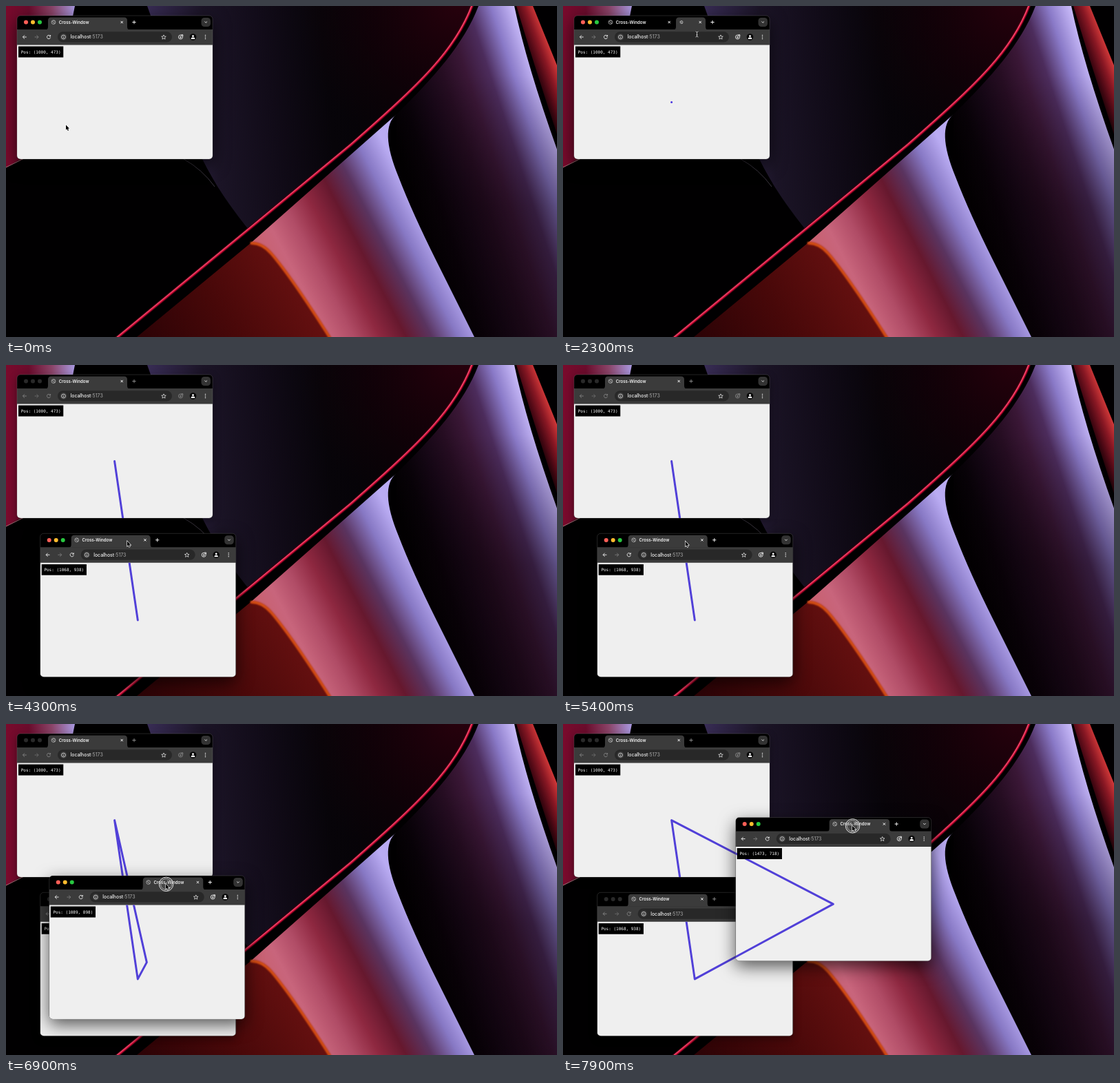
An HTML page with a canvas that plays this animation: 800 px wide and 480 px high, repeating every 8000 ms.

```html
<!DOCTYPE html>
<html lang="en">
<head>
<meta charset="utf-8">
<title>Cross-Window</title>
<style>
  html, body { margin: 0; width: 800px; height: 480px; overflow: hidden; background: #000; }
  canvas { display: block; }
</style>
</head>
<body>
<canvas id="stage" width="800" height="480"></canvas>
<script>
const LOOP = 8000, WIDTH = 284, HEIGHT = 208, PAGE_TOP = 42.5;
const CENTER = { x: 141.6, y: 125.6 };
const TEAR_2 = 2750, DROP_2 = 3850, TEAR_3 = 6750;
const UI = 'Inter, "Open Sans", sans-serif';
const MONO = '"DejaVu Sans Mono", monospace';

// Key points: time, x, y
const home = { x: 16, y: 14 };
const secondPath = [[2800, 16, 14], [3400, 9.3, 184.5], [3800, 49.7, 244.3]];
const thirdPath = [[6750, 49.7, 244.3], [7300, 149.7, 111.3], [7900, 250.7, 135.5]];
const cursorPath = [
  [200, 87, 172.5], [900, 118, 172], [1700, 186, 24], [2300, 194.5, 41], [2700, 178.5, 28],
  [DROP_2, 212, 258], [4300, 176, 255.5], [6200, 181, 256], [6650, 219, 256.3]
];

const ramp = (t, a, b) => Math.min(1, Math.max(0, (t - a) / (b - a)));
const mix = (a, b, p) => a + (b - a) * p;

// Smooth path that never overshoots its key points.
function along(keys, t, axis) {
  const slope = i => keys[i] && keys[i + 1]
    ? (keys[i + 1][axis] - keys[i][axis]) / (keys[i + 1][0] - keys[i][0]) : 0;
  const speed = i => {
    const a = slope(i - 1), b = slope(i);
    return a * b > 0 ? 2 * a * b / (a + b) : 0;
  };
  let i = 0;
  while (i < keys.length - 2 && t > keys[i + 1][0]) i++;
  const [a, b] = [keys[i], keys[i + 1]];
  const p = ramp(t, a[0], b[0]), q = 1 - p;
  return mix(a[axis], b[axis], p * p * (3 - 2 * p)) +
    (b[0] - a[0]) * p * q * (q * speed(i) - p * speed(i + 1));
}
const track = (keys, t) => ({ x: along(keys, t, 1), y: along(keys, t, 2) });

const c = document.getElementById('stage').getContext('2d');

function spread(gradient, colors) {
  colors.forEach((color, i) => gradient.addColorStop(i / (colors.length - 1), color));
  return gradient;
}
// Gradient whose lines of equal colour satisfy x - k * y = constant.
function slanted(g, k, from, to, colors) {
  const n = 1 + k * k;
  return spread(g.createLinearGradient(from / n, -k * from / n, to / n, -k * to / n), colors);
}

function paintWallpaper() {
  const sheet = document.createElement('canvas');
  sheet.width = 800;
  sheet.height = 480;
  const g = sheet.getContext('2d');
  const fill = (d, style) => { g.fillStyle = style; g.fill(new Path2D(d)); };
  const line = (d, style, width) => {
    g.strokeStyle = style;
    g.lineWidth = width;
    g.stroke(new Path2D(d));
  };
  fill('M0 0H800V480H0Z', '#010001');

  // Left sheet
  fill('M0 0H100L60 200L0 234Z', slanted(g, 0, 0, 100, ['#7a0a2c', '#6a0c2c', '#8a4468', '#a898e0']));
  line('M0 234L40 214', '#b5707e', 1);

  // Dark upper sheet
  const dusk = 'M205 0H677C652 66 600 115 500 202L352 324C325 290 305 262 285 222Z';
  fill(dusk, slanted(g, 0.1, 200, 540, ['#3a2e58', '#1b1426', '#110b18', '#070409', '#050206']));
  fill(dusk, spread(g.createRadialGradient(660, -10, 0, 660, -10, 240), ['rgba(56,0,16,.7)', 'rgba(30,0,8,0)']));
  line('M258 222Q285 237 303 262', '#4a4450', 0.8);

  // Right tube
  const tube = 'M686 0C665 55 620 105 567 157L560 480H800V208Q756 85 738 0Z';
  fill(tube, slanted(g, 0.33, 500, 738, [
    '#000', '#080208', '#160716', '#260d22', '#3a1736', '#4c2c5c', '#8a7ac8', '#cabcfa'
  ]));
  fill(tube, spread(g.createLinearGradient(0, 100, 0, 480), ['rgba(8,0,5,0)', 'rgba(8,0,5,.35)', 'rgba(8,0,5,.4)']));

  // Far right strip
  fill('M741 0H765L800 86V186Q765 80 741 0Z', slanted(g, 0.38, 725, 767, ['#080002', '#4a0814', '#8a1824', '#d03838']));

  // Lower left sheet
  fill('M355 344L190 480H472Q400 356 372 347Z', slanted(g, 0.6, -90, 185, ['#2d0306', '#480809', '#651010']));

  // Petal
  fill('M567 157L355 344Q371 343 385 359Q415 394 470 480H680L625 370Q590 300 570 248Q541 178 567 157Z',
    slanted(g, 0.52, 180, 445, [
      '#c8606e', '#c8657c', '#b04c66', '#8e2840', '#66182e', '#5a3460', '#8778c4', '#b9abf2'
    ]));
  g.save();
  g.filter = 'blur(1px)';
  const ember = 'M355 344Q371 343 385 359Q415 394 472 484';
  line(ember, '#b8340c', 4);
  line(ember, '#e8641a', 1.5);
  g.restore();

  // Bright rim
  const rim = 'M678 -4C653 65 601 113 501 201L352 324L160 482';
  line(rim, '#4a0014', 5);
  line(rim, '#d8123c', 2.6);
  g.translate(-0.6, -0.6);
  line(rim, '#ff8098', 0.8);
  return sheet;
}
const wallpaper = paintWallpaper();

function box(x, y, w, h, r, color) {
  c.fillStyle = color;
  c.beginPath();
  c.roundRect(x, y, w, h, r);
  c.fill();
}
function disc(x, y, r, color) {
  c.fillStyle = color;
  c.beginPath();
  c.arc(x, y, r, 0, 7);
  c.fill();
}
function icon(x, y, d, color, width = 0.9) {
  c.save();
  c.translate(x, y);
  c.strokeStyle = color;
  c.lineWidth = width;
  c.stroke(new Path2D(d));
  c.restore();
}
function text(s, x, y, font, color) {
  c.font = font;
  c.fillStyle = color;
  c.fillText(s, x, y);
}
const ring = r => `M${r} 0A${r} ${r} 0 1 1 ${-r} 0A${r} ${r} 0 1 1 ${r} 0`;

function drawTab({ x, w, active, untitled }) {
  if (active) {
    c.fillStyle = '#3b3b3b';
    c.fill(new Path2D(`M${x - 4} 20.5Q${x} 20.5 ${x} 16V7Q${x} 2.5 ${x + 4.5} 2.5H${x + w - 4.5}` +
      `Q${x + w} 2.5 ${x + w} 7V16Q${x + w} 20.5 ${x + w + 4} 20.5Z`));
  }
  icon(x + 8, 9.5, ring(untitled ? 2 : 2.9), '#bbb', 0.8);
  icon(x + 8, 9.5, 'M-2.2 -1Q0 -.6 0 .6T2 1.2M-.2 -2.4L1.4 -.8', '#bbb', 0.9);
  if (!untitled) text('Cross-Window', x + 15.7, 11.8, '600 6.1px ' + UI, '#f4f4f4');
  icon(x + w - 7.8, 9.5, 'M-1.6 -1.6L1.6 1.6M1.6 -1.6L-1.6 1.6', '#fff', 1);
}

function drawToolbar(focus) {
  const strong = focus ? '#f0f0f0' : '#858585';
  box(0, 20, WIDTH, 23, 0, '#3b3b3b');
  icon(11, 31, 'M2.8 0H-2.6M0 -2.6L-2.6 0L0 2.6', strong);
  icon(28.5, 31, 'M-2.8 0H2.6M0 -2.6L2.6 0L0 2.6', focus ? '#7c7c7c' : '#6c6c6c');
  icon(46, 31, 'M2.2 -1.5A2.6 2.6 0 1 0 2.6 .5M2.6 -3V-1H.6', strong);
  box(59, 23.3, 166, 15.2, 7.6, '#282828');
  disc(67.5, 31, 5, '#3b3b3b');
  icon(67.5, 31, ring(2.9) + 'M0 -.3V1.6M0 -1.6V-.9', '#ddd', 0.8);
  const font = '500 6.9px ' + UI;
  text('localhost', 77.5, 33.4, font, '#f2f2f2');
  text(':5173', 77.5 + c.measureText('localhost').width, 33.4, font, '#9a9a9a');
  icon(213, 31.2, 'M0 -3.3L1 -1H3.3L1.5 .6L2.1 2.9L0 1.6L-2.1 2.9L-1.5 .6L-3.3 -1H-1Z', '#ddd', 0.8);
  icon(237.5, 31, ring(3) + 'M1 -2L-1 .3H1L-.6 2.2M1 -3.3H3.3V-1', strong);
  disc(255.5, 31, 4.8, '#080808');
  disc(255.5, 29.6, 1.4, '#fff');
  box(252.7, 31.6, 5.6, 2.4, [2, 2, 0.5, 0.5], '#fff');
  for (const dy of [-2.5, 0, 2.5]) disc(273.5, 31 + dy, 0.75, '#eee');
}

function drawPage({ x, y, seen, dot }, windows) {
  box(0, PAGE_TOP, WIDTH, HEIGHT, 0, '#efefef');
  c.save();
  c.beginPath();
  c.rect(0, PAGE_TOP, WIDTH, HEIGHT);
  c.clip();
  if (windows.length > 1) {
    c.beginPath();
    for (const w of windows) c.lineTo(w.x - x + CENTER.x, w.y - y + CENTER.y);
    c.closePath();
    c.strokeStyle = '#5140d8';
    c.lineWidth = 3;
    c.lineJoin = 'round';
    c.stroke();
  } else if (dot) {
    disc(CENTER.x, CENTER.y, 1.5, '#4a36e0');
  }
  const px = Math.round(1000 + (seen.x - home.x) * 2.018);
  const py = Math.round(473 + (seen.y - home.y) * 2.018);
  const label = `Pos: (${px}, ${py})`;
  box(2, 44.6, label.length * 3.61 + 7.5, 15.9, 0, '#000');
  text(label, 5.7, 54.9, '6px ' + MONO, '#fff');
  c.restore();
}

function drawWindow(win, windows) {
  const { x, y, focus, tabs } = win;
  c.save();
  c.translate(x, y);
  c.shadowColor = focus ? 'rgba(0,0,0,.65)' : 'rgba(0,0,0,.4)';
  c.shadowBlur = focus ? 24 : 12;
  c.shadowOffsetY = focus ? 8 : 4;
  box(0, 0, WIDTH, HEIGHT, 5, '#000');
  c.shadowColor = 'transparent';

  c.save();
  c.beginPath();
  c.roundRect(0, 0, WIDTH, HEIGHT, 5);
  c.clip();
  ['#ff5f57', '#febc2e', '#28c840'].forEach((color, i) =>
    disc(13 + i * 10, 9.6, 3, focus ? color : '#292929'));
  tabs.forEach(drawTab);
  const last = tabs[tabs.length - 1];
  icon(last.x + last.w + 10, 9.5, 'M-2.6 0H2.6M0 -2.6V2.6', focus ? '#f0f0f0' : '#858585', 1);
  box(267.5, 3, 13.5, 13, 4.5, '#333');
  icon(274.2, 9.3, 'M-1.8 -.8L0 1L1.8 -.8', '#eee');
  drawToolbar(focus);
  drawPage(win, windows);
  c.restore();

  c.strokeStyle = 'rgba(150,150,150,.4)';
  c.lineWidth = 0.6;
  c.beginPath();
  c.roundRect(0, 0, WIDTH, HEIGHT, 5);
  c.stroke();
  c.restore();
}

// A settled tab, with a second one of share p opening beside it.
function tabStrip(p, second, untitled) {
  const w = 115 - 28 * p;
  const tabs = [{ x: 45, w, active: !second }];
  if (second) tabs.push({ x: 45 + w + 4 * p, w: 86 * p, active: true, untitled });
  return tabs;
}

function drawCursor(t, front) {
  const dragged = front.grab && (t < DROP_2 || t >= TEAR_3);
  const { x, y } = dragged
    ? { x: front.x + front.grab.x, y: front.y + front.grab.y }
    : track(cursorPath, t);
  const dx = x - front.x, dy = y - front.y;
  if (dx > 59 && dx < 225 && dy > 23 && dy < 39) {
    const beam = 'M-2 -4Q0 -4 0 -2.6Q0 -4 2 -4M0 -3V3M-2 4Q0 4 0 2.6Q0 4 2 4M-1 .9H1';
    icon(x, y, beam, '#111', 2);
    icon(x, y, beam, '#ddd');
    return;
  }
  if (dragged) {
    disc(x + 0.5, y + 0.3, 10, 'rgba(120,120,120,.18)');
    icon(x + 0.5, y + 0.3, ring(10.2), '#e6e6e6', 1);
    icon(x + 0.5, y + 0.3, ring(8), 'rgba(220,220,220,.8)', 0.8);
  }
  const arrow = 'M0 0V7.2L1.6 5.8L2.8 8.4L4 7.8L2.9 5.3H5Z';
  icon(x, y, arrow, '#fff', 1.2);
  c.save();
  c.translate(x, y);
  c.fillStyle = '#000';
  c.fill(new Path2D(arrow));
  c.restore();
}

function draw(t) {
  c.drawImage(wallpaper, 0, 0);
  const torn2 = t >= TEAR_2, torn3 = t >= TEAR_3;
  const open1 = ramp(t, 2200, 2400) - ramp(t, TEAR_2, TEAR_2 + 150);
  const windows = [{
    ...home, seen: home, focus: !torn2, dot: t >= 2250,
    tabs: tabStrip(open1, !torn2 && open1 > 0, t < 2450)
  }];
  // The page learns its own position a moment late.
  const follow = path => ({ ...track(path, t), seen: track(path, t - 16) });
  if (torn2) {
    const settle = ramp(t, DROP_2, DROP_2 + 200);
    const open2 = ramp(t, 5700, 5900) - ramp(t, TEAR_3, TEAR_3 + 150);
    windows.push({
      ...follow(secondPath), focus: !torn3, grab: { x: 162.5, y: 14 },
      tabs: settle < 1
        ? [{ x: mix(120, 45, settle), w: mix(87.5, 115, settle), active: true }]
        : tabStrip(open2, !torn3 && open2 > 0, t < 5950)
    });
  }
  if (torn3) {
    windows.push({
      ...follow(thirdPath), focus: true, grab: { x: 169.3, y: 12 },
      tabs: [{ x: 136, w: 87.5, active: true }]
    });
  }
  for (const win of windows) drawWindow(win, windows);
  drawCursor(t, windows[windows.length - 1]);
}

const start = performance.now();
function tick() {
  // The picture advances in steps of a tenth of a second.
  draw(Math.floor((performance.now() - start) % LOOP / 100) * 100);
  requestAnimationFrame(tick);
}
tick();
</script>
</body>
</html>
```
